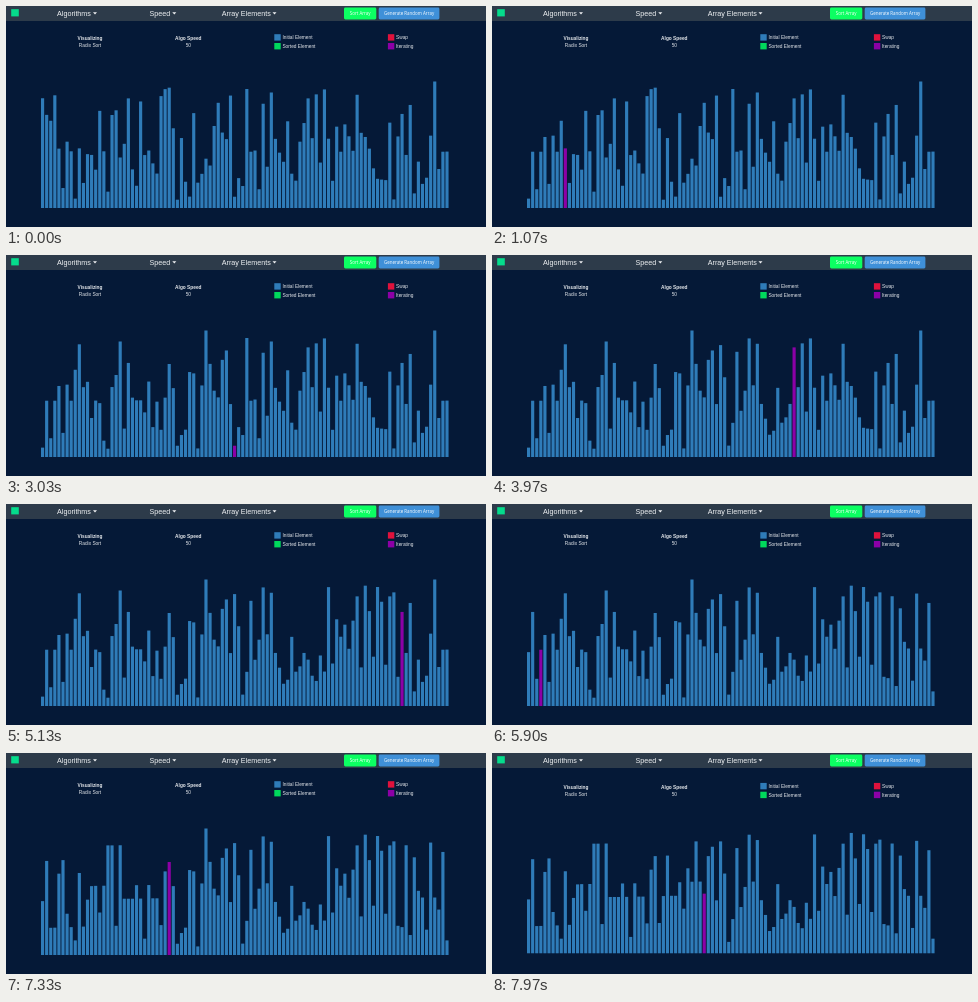
Animation, 480 px wide and 221 px high, one loop 8 s. Source, as an HTML page:

```html
<!DOCTYPE html>
<html lang="en">
<head>
<meta charset="utf-8">
<title>Radix sort</title>
<style>
  html, body { margin: 0; width: 100%; height: 100%; overflow: hidden; background: #051937; }
  svg { display: block; width: 100vw; height: 100vh; }
  text { font-family: "Liberation Sans", Arial, sans-serif; font-size: 4.8px; fill: #e4e7eb; }
  .menu { font-size: 7.2px; fill: #f0f2f4; }
  .button { font-family: "Open Sans", sans-serif; font-size: 4.47px; fill: #fff; text-anchor: middle; }
  .center { text-anchor: middle; }
  .bold { font-weight: bold; }
</style>
</head>
<body>
<svg id="stage" viewBox="0 0 480 221">
  <rect width="480" height="221" fill="#051937"/>
  <rect width="480" height="15" fill="#2d3b4a"/>
  <rect x="5.2" y="3.2" width="7.6" height="7.2" fill="#05dc8c"/>
  <g id="header"></g>
  <g id="legend"></g>
  <g id="bars"></g>
</svg>
<script>
const LOOP = 8000, START = 571, STEP = 51.6;
const BASE = 202, SCALE = 0.134, LEFT = 35, PITCH = 4.085, WIDTH = 3.15;
const BLUE = '#2f7cb9', PURPLE = '#8c00a6';

const values = [
  819, 695, 651, 841, 443, 149, 495, 423, 70, 445,
  187, 402, 396, 286, 725, 423, 122, 694, 729, 377,
  479, 818, 288, 166, 795, 395, 429, 333, 257, 835,
  887, 898, 595, 62, 522, 196, 85, 708, 189, 255,
  368, 317, 612, 785, 563, 514, 839, 84, 223, 164,
  888, 420, 429, 140, 778, 308, 862, 516, 413, 345,
  647, 256, 204, 495, 634, 818, 521, 848, 339, 885,
  517, 203, 607, 420, 624, 535, 427, 845, 561, 530,
  443, 296, 218, 212, 208, 637, 64, 534, 702, 396,
  769, 109, 346, 180, 226, 540, 944, 291, 420, 421
];

const byDigit = (list, unit) => {
  const digit = v => Math.floor(v / unit) % 10;
  return [...list].sort((a, b) => digit(a) - digit(b));
};
const ones = byDigit(values, 1);
const passes = [values, ones, byDigit(ones, 10)];
const tallest = Math.max(...values);

const $ = id => document.getElementById(id);
function add(parent, tag, attrs, text = '') {
  const node = document.createElementNS('http://www.w3.org/2000/svg', tag);
  for (const key in attrs) node.setAttribute(key, attrs[key]);
  node.textContent = text;
  parent.append(node);
  return node;
}

const header = $('header'), legend = $('legend');
[['Algorithms', 51, 87], ['Speed', 143.5, 166.3], ['Array Elements', 215.7, 266.5]].forEach(([name, x, caret]) => {
  add(header, 'text', { x, y: 10, class: 'menu' }, name);
  add(header, 'path', { d: `M${caret} 6.3h4l-2 2.3z`, fill: '#f0f2f4' });
});
[['Sort Array', 338, 32.3, '#0cff62'], ['Generate Random Array', 372.7, 60.7, '#3f90d8']].forEach(([name, x, width, fill]) => {
  add(header, 'rect', { x, y: 1.6, width, height: 11.8, rx: 1.4, fill });
  add(header, 'text', { x: x + width / 2, y: 9.2, class: 'button' }, name);
});
[['Visualizing', 'Radix Sort', 84], ['Algo Speed', '50', 182.3]].forEach(([title, info, x]) => {
  add(legend, 'text', { x, y: 34, class: 'center bold' }, title);
  add(legend, 'text', { x, y: 41.4, class: 'center' }, info);
});
[
  ['Initial Element', 268.3, 28.2, BLUE], ['Sorted Element', 268.3, 37, '#00d95c'],
  ['Swap', 381.9, 28.2, '#e0123c'], ['Iterating', 381.9, 37, PURPLE]
].forEach(([name, x, y, fill]) => {
  add(legend, 'rect', { x, y, width: 6.4, height: 6.4, fill });
  add(legend, 'text', { x: x + 8.1, y: y + 5.1 }, name);
});

const bars = values.map((_, i) => add($('bars'), 'rect', { x: LEFT + i * PITCH, width: WIDTH }));

function draw(time) {
  const step = Math.floor((time - START) / STEP);
  const done = Math.max(0, step);
  const pass = Math.floor(done / values.length), cursor = done % values.length;
  const current = values.map((_, i) => passes[pass + (i < cursor ? 1 : 0)][i]);
  // The panel closes in on its centre when the tallest bar is gone.
  const shift = (tallest - Math.max(...current)) * SCALE * 0.28;

  bars.forEach((bar, i) => {
    const height = current[i] * SCALE;
    bar.setAttribute('y', BASE - shift - height);
    bar.setAttribute('height', height);
    bar.setAttribute('fill', step >= 0 && i === cursor ? PURPLE : BLUE);
  });
  legend.setAttribute('transform', `translate(0 ${shift})`);
}

const begin = performance.now();
function tick() {
  draw((performance.now() - begin) % LOOP);
  requestAnimationFrame(tick);
}
tick();
</script>
</body>
</html>
```
